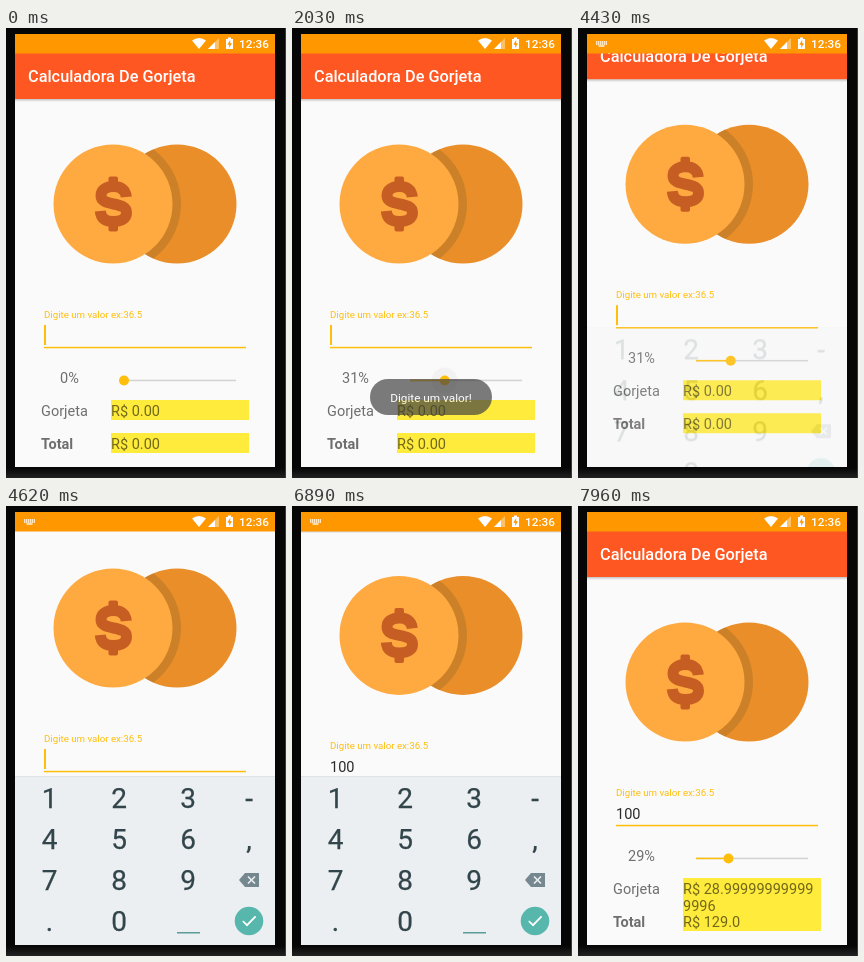
Write an HTML page that moves like this. It is 280 px wide and 450 px high and loops after 8 s.

```html
<!DOCTYPE html>
<html lang="pt">
<head>
<meta charset="utf-8">
<title>Calculadora De Gorjeta</title>
<style>
  html, body { margin: 0; width: 100%; height: 100%; overflow: hidden; background: #060606; }
  svg { display: block; width: 100vw; height: 100vh; }
  text { font-family: Roboto, sans-serif; font-size: 14.5px; white-space: pre; }
  .soft { fill: rgba(0, 0, 0, .56); }
  .accent { fill: #ffbe0b; }
  .key text { font-size: 28px; text-anchor: middle; fill: #31454b; stroke: #31454b; stroke-width: .25; }
</style>
</head>
<body>
<svg viewBox="0 0 280 450">
  <defs>
    <clipPath id="screen"><rect x="9" y="6" width="260" height="433"/></clipPath>
    <clipPath id="backCoin"><circle cx="171" cy="176" r="59.5"/></clipPath>
    <linearGradient id="shade" x2="0" y2="1">
      <stop stop-opacity=".22"/><stop offset="1" stop-opacity="0"/>
    </linearGradient>
    <linearGradient id="bezel" x2="0" y2="1">
      <stop stop-color="#060606"/><stop offset="1" stop-color="#222"/>
    </linearGradient>
  </defs>
  <rect width="280" height="450" fill="#060606"/>
  <rect y="440" width="280" height="10" fill="url(#bezel)"/>
  <rect x="279" width="1" height="450" fill="#3a3a3a"/>
  <g clip-path="url(#screen)">
    <rect x="9" y="6" width="260" height="433" fill="#fafafa"/>

    <g id="app">
      <rect x="9" y="71" width="260" height="3" fill="url(#shade)"/>
      <rect x="9" y="25" width="260" height="46" fill="#ff5722"/>
      <text x="22" y="54" fill="#fff" style="font-size:16.3px;font-weight:500">Calculadora De Gorjeta</text>

      <circle cx="171" cy="176" r="59.5" fill="#e98e29"/>
      <circle cx="107" cy="176" r="68" fill="#cc8129" clip-path="url(#backCoin)"/>
      <circle cx="107" cy="176" r="59.5" fill="#ffaa41"/>
      <g fill="#c65e23">
        <rect x="102.5" y="148.5" width="9.5" height="9" rx="2"/>
        <rect x="102.5" y="194" width="9.5" height="9.5" rx="2"/>
        <path fill="none" stroke="#c65e23" stroke-width="11" d="M120.3 169C119.5 161 114 158.5 107.5 158.5C100 158.5 95 162 95 167.5C95 173 100 174.5 107.5 176C115.5 177.6 120.5 179 120.5 185C120.5 190.5 115 193.5 107.5 193.5C100 193.5 95 191 94.3 183"/>
      </g>

      <text x="38" y="290" class="accent" style="font-size:9.7px">Digite um valor ex:36.5</text>
      <rect x="38" y="318.8" width="202" height="1.5" class="accent"/>
      <text id="amount" x="38" y="313" fill="#2a2a2a"></text>
      <rect id="caret" y="297" width="2" height="20" class="accent"/>

      <text id="percent" x="63.5" y="355" class="soft" text-anchor="middle"></text>
      <rect x="118" y="351.7" width="112" height="1.5" fill="#d2d2d2"/>
      <rect id="fill" x="118" y="351.7" height="1.5" class="accent"/>
      <circle id="ripple" cy="352.5" r="13"/>
      <circle id="thumb" cy="352.5" r="5" class="accent"/>

      <text x="35" y="388" class="soft">Gorjeta</text>
      <text x="35" y="421" class="soft" font-weight="700">Total</text>
      <rect id="tipBox" x="105" y="372" width="138" fill="#ffeb3b"/>
      <rect x="105" y="405" width="138" height="20" fill="#ffeb3b"/>
      <text id="tip" x="105" y="388" class="soft"></text>
      <text id="tipRest" x="105" y="405" class="soft"></text>
      <text id="total" x="105" y="421" class="soft"></text>
    </g>

    <g id="keyboard" class="key">
      <rect x="9" y="270" width="260" height="1" fill="#dfe3e5"/>
      <rect x="9" y="271" width="260" height="168" fill="#eceff1"/>
      <rect id="press" width="65" height="32" rx="2" fill="#cfd8dc"/>
      <g id="keys"></g>
      <rect x="171" y="426" width="23" height="1.5" fill="#5a9c97"/>
      <path d="M233 374L239 367H253V381H239Z" fill="#75878f"/>
      <path d="M242 370.5L249 377.5M249 370.5L242 377.5" stroke="#eceff1" stroke-width="1.6"/>
      <circle cx="243" cy="415" r="14.3" fill="#58b7ad"/>
      <path d="M236.8 415L241 419.2L249.6 410.4" fill="none" stroke="#fff" stroke-width="1.7"/>
    </g>

    <g id="toast">
      <rect x="78" y="351" width="122" height="36" rx="18" fill="#424242" fill-opacity=".9"/>
      <text x="139" y="374" fill="#fff" text-anchor="middle" style="font-size:11.8px">Digite um valor!</text>
    </g>

    <rect x="9" y="6" width="260" height="19.5" fill="#ff9800"/>
    <g id="imeIcon" fill="none" stroke="#fff" stroke-width="1.3" stroke-dasharray="1.4 .6">
      <path d="M18 14H29M18 16H29"/>
      <path d="M20.5 18H26.5" stroke-dasharray="none"/>
    </g>
    <g fill="#fff">
      <path d="M193 21L186 12.5Q193 7.5 200 12.5Z"/>
      <path d="M202 21L213 10V21Z" opacity=".4"/>
      <path d="M202 21L209 14V21Z"/>
      <path d="M220 11H222V9.5H225V11H227V21H220Z"/>
      <path d="M224.2 12L221.3 16.7H223.2V20L226 15.3H224.2Z" fill="#ff9800"/>
      <text x="263" y="20" text-anchor="end" style="font-size:11.8px;font-weight:500">12:36</text>
    </g>
  </g>
</svg>
<script>
const LOOP = 8000, PAN = 54, DROP = 34;
const el = Object.fromEntries([...document.querySelectorAll('[id]')].map(e => [e.id, e]));
const cols = [43.5, 113, 182, 243], rows = [292, 333, 374, 415];

['123-', '456,', '789', '.0'].forEach((line, r) => [...line].forEach((char, c) => {
  const key = document.createElementNS('http://www.w3.org/2000/svg', 'text');
  key.setAttribute('x', cols[c]);
  key.setAttribute('y', rows[r] + 10);
  key.textContent = char;
  el.keys.append(key);
}));

const caretOn = [[0, 100], [600, 1100], [1660, 2100], [2600, 3160], [3590, 4100],
  [4430, 5860], [6160, 6780], [7280, 7780]];
// start, end, column, row
const presses = [[5190, 5360, 0, 0], [6100, 6190, 1, 3], [6220, 6280, 1, 3]];
const typed = [[0, ''], [5280, '1'], [6160, '10'], [6280, '100']];
const slider = [[0, 0], [1720, 31], [7960, 29]];

const ramp = (t, a, b) => Math.min(1, Math.max(0, (t - a) / (b - a)));
const easeOut = p => 1 - (1 - p) ** 3;
const within = t => ([a, b]) => t >= a && t < b;
const latest = (steps, t) => steps.filter(s => s[0] <= t).pop()[1];
const set = (id, attrs) => {
  for (const k in attrs) el[id].setAttribute(k, attrs[k]);
};
const write = (id, s) => {
  if (el[id].textContent !== s) el[id].textContent = s;
};

function render(t) {
  const pan = PAN * (easeOut(ramp(t, 4400, 4620)) - easeOut(ramp(t, 6880, 7110)));
  set('app', { transform: `translate(0 ${-pan})` });

  const shown = ramp(t, 4400, 4620) - ramp(t, 6900, 7100);
  set('keyboard', { opacity: shown, transform: `translate(0 ${DROP * (1 - shown)})` });
  set('imeIcon', { opacity: +(t >= 4430 && t < 6900) });

  const press = presses.find(within(t));
  set('press', { opacity: +!!press });
  if (press) set('press', { x: cols[press[2]] - 32.5, y: rows[press[3]] - 16 });

  const amount = latest(typed, t);
  write('amount', amount);
  set('caret', { x: 38 + 8.1 * amount.length, opacity: +caretOn.some(within(t)) });

  const percent = latest(slider, t), x = 118 + 1.12 * percent;
  write('percent', percent + '%');
  set('fill', { width: x - 118 });
  set('thumb', { cx: x });
  set('ripple', { cx: x, opacity: .03 * (ramp(t, 1700, 1780) - ramp(t, 2050, 2290)) });

  const done = t >= 7960;
  write('tip', done ? 'R$ 28.99999999999' : 'R$ 0.00');
  write('tipRest', done ? '9996' : '');
  write('total', done ? 'R$ 129.0' : 'R$ 0.00');
  set('tipBox', { height: done ? 36 : 20 });

  set('toast', { opacity: ramp(t, 1760, 2110) - ramp(t, 3830, 4180) });
}

const start = performance.now();
function tick() {
  render((performance.now() - start) % LOOP);
  requestAnimationFrame(tick);
}
tick();
</script>
</body>
</html>
```
